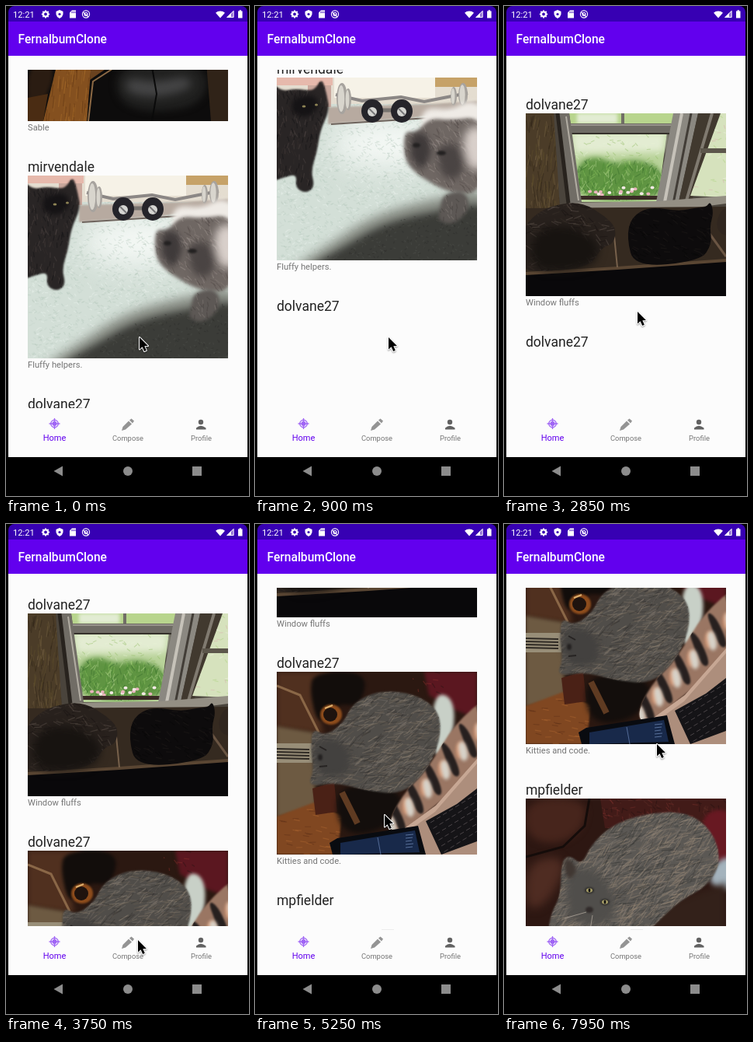
Animation of 313x630 px, one loop 8000 ms. Source, as an HTML page with a canvas:

```html
<!DOCTYPE html>
<html lang="en">
<head>
<meta charset="utf-8">
<title>FernalbumClone</title>
<style>
html, body { margin: 0; width: 100%; height: 100%; overflow: hidden; background: #000; }
canvas { display: block; width: 313px; height: 630px; }
</style>
</head>
<body>
<canvas id="stage" width="313" height="630"></canvas>
<script>
const ctx = document.getElementById('stage').getContext('2d');
const LOOP = 8000, STEP = 150, PITCH = 305, PW = 258, PH = 235;
const FONT = 'Roboto, sans-serif';

function random(seed) {
  return () => {
    seed = (seed * 1664525 + 1013904223) >>> 0;
    return seed / 4294967296;
  };
}

// Closed path through flat x,y points, either straight or rounded.
function path(p, smooth) {
  const out = new Path2D(), n = p.length / 2;
  const at = i => [p[(i % n) * 2], p[(i % n) * 2 + 1]];
  const mid = i => {
    const [a, b] = at(i), [c, d] = at(i + 1);
    return [(a + c) / 2, (b + d) / 2];
  };
  out.moveTo(...(smooth ? mid(0) : at(0)));
  for (let i = 1; i <= n; i++) {
    if (smooth) out.quadraticCurveTo(...at(i), ...mid(i));
    else out.lineTo(...at(i));
  }
  out.closePath();
  return out;
}

class Painter {
  constructor(seed, base) {
    this.canvas = document.createElement('canvas');
    this.canvas.width = PW;
    this.canvas.height = PH;
    this.g = this.canvas.getContext('2d');
    this.rnd = random(seed);
    this.rect(base, 0, 0, PW, PH);
  }
  rect(color, x, y, w, h) {
    this.g.fillStyle = color;
    this.g.fillRect(x, y, w, h);
  }
  fill(color, p, smooth = false, blur = 0) {
    const shape = path(p, smooth);
    this.g.filter = blur ? `blur(${blur}px)` : 'none';
    this.g.fillStyle = color;
    this.g.fill(shape);
    this.g.filter = 'none';
    return shape;
  }
  blob(color, p, blur = 0.7) { return this.fill(color, p, true, blur); }
  oval(color, x, y, rx, ry = rx, blur = 0) {
    this.g.filter = blur ? `blur(${blur}px)` : 'none';
    this.g.fillStyle = color;
    this.g.beginPath();
    this.g.ellipse(x, y, rx, ry, 0, 0, 7);
    this.g.fill();
    this.g.filter = 'none';
  }
  line(color, w, ...p) {
    this.g.strokeStyle = color;
    this.g.lineWidth = w;
    this.g.beginPath();
    for (let i = 0; i < p.length; i += 2) this.g.lineTo(p[i], p[i + 1]);
    this.g.stroke();
  }
  // Short strokes scattered over a shape: fur, carpet, leaves.
  fur(shape, colors, n, len, angle, spread = 0.5) {
    const { g, rnd } = this;
    g.save();
    g.clip(shape);
    g.globalAlpha = 0.4;
    for (let i = 0; i < n; i++) {
      const x = rnd() * PW, y = rnd() * PH, a = angle + (rnd() - 0.5) * 2 * spread;
      const c = colors[Math.floor(rnd() * colors.length)];
      this.line(c, 1.2, x, y, x + len * Math.cos(a), y + len * Math.sin(a));
    }
    g.restore();
  }
}

function sofaPhoto() {
  const p = new Painter(5, '#0d0c0c');
  p.fill('#20201f', [118, 160, 232, 160, 228, 215, 150, 225, 112, 205], true, 5);
  p.blob('#454546', [128, 178, 165, 186, 205, 176, 215, 192, 165, 206, 125, 198], 6);
  p.line('#0a0a0a', 2, 160, 165, 166, 200, 160, 235);
  const wood = p.fill('#84501f', [38, 160, 82, 160, 76, 235, 20, 235]);
  p.fur(wood, ['#b5762f', '#5c3313', '#9c6428'], 900, 16, 1.65, 0.08);
  p.fill('#2a1c12', [0, 160, 36, 160, 26, 205, 0, 225], true, 2);
  p.fill('#4a2c13', [0, 205, 26, 200, 20, 235, 0, 235]);
  p.fill('#6a421f', [82, 160, 112, 160, 80, 182]);
  p.line('#8d6a45', 2, 112, 166, 84, 184, 78, 235);
  p.fill('#302318', [230, 160, 258, 160, 258, 235, 236, 235]);
  return p.canvas;
}

function carpetPhoto() {
  const p = new Painter(11, '#d3dfd7');
  const all = path([0, 0, PW, 0, PW, PH, 0, PH]);
  p.oval('#f4f8f5', 145, 85, 75, 32, 18);
  p.fur(all, ['#b5c8bc', '#eef4f0', '#c3d2c8'], 2600, 4, 0.2, 1);
  p.rect('#e4ddd0', 0, 0, PW, 34);
  p.rect('#e6b9ac', 0, 0, 72, 10);
  p.rect('#c9a79c', 40, 10, 30, 28);
  p.rect('#f6f2e7', 74, 0, 130, 26);
  p.rect('#c6a268', 204, 0, 54, 12);
  p.fill('#b7aaa0', [66, 38, 130, 36, 200, 34, 258, 30, 258, 38, 175, 52, 66, 60], false, 1);
  p.line('#6e645d', 2, 70, 60, 195, 52);
  // Weights
  p.line('#8b8785', 4, 76, 22, 110, 30, 160, 25, 190, 31, 215, 26, 246, 20);
  for (const [x, y, w, h] of [[84, 27, 7, 20], [92, 28, 4, 14], [240, 22, 6, 15], [228, 24, 4, 12]]) {
    p.oval('#a7a39e', x, y, w, h);
    p.oval('#d8d5cd', x - 1, y, w * 0.6, h * 0.85);
  }
  p.line('#77736f', 5, 123, 42, 162, 42);
  for (const x of [123, 161]) {
    p.oval('#25242a', x, 43, 14, 15);
    p.oval('#d5d5d2', x, 44, 6, 6);
    p.line('#77777a', 2, x - 4, 40, x + 4, 48);
  }
  // Shadow across the floor
  p.blob('#83877f', [20, 245, 72, 212, 115, 183, 165, 165, 220, 153, 275, 140, 275, 255, 20, 255], 7);
  const shade = p.blob('#3b3c38', [38, 245, 90, 216, 132, 191, 180, 177, 230, 168, 275, 160, 275, 260, 38, 260], 5);
  p.fur(shade, ['#52544e', '#2b2b29'], 1500, 3, 0, 1.5);
  // Dark cat
  const cat = p.blob('#292525', [-8, 4, 6, 18, 25, 14, 48, 18, 58, 0, 64, 20, 68, 42, 56, 68, 52, 95, 44, 120, 49, 140,
    38, 149, 24, 142, 26, 124, 10, 128, -10, 135], 1);
  p.fur(cat, ['#111012', '#554c4a', '#39312f'], 1600, 7, 1.5);
  p.blob('#151315', [18, 28, 45, 20, 57, 35, 42, 52, 20, 48], 3);
  p.oval('#8e8455', 35, 37, 2.4, 1.6);
  p.oval('#8e8455', 51, 35, 2, 1.5);
  // Grey cat
  p.blob('#efebe6', [184, 52, 195, 38, 225, 42, 248, 28, 270, 40, 270, 90, 190, 92], 3);
  const face = p.blob('#6f6763', [164, 68, 180, 72, 196, 52, 225, 55, 262, 50, 272, 95, 262, 150, 225, 148, 202, 138,
    178, 122, 164, 105], 2);
  p.fur(face, ['#a69c96', '#514a48', '#89807b'], 1700, 8, 0.9);
  p.blob('#3f3a3a', [172, 74, 190, 68, 202, 92, 188, 122, 172, 105], 4);
  p.blob('#4a4443', [205, 90, 228, 82, 243, 104, 235, 132, 212, 128], 5);
  p.oval('#242222', 180, 87, 5, 3, 1);
  p.oval('#242222', 212, 97, 6, 3, 1);
  p.fill('#d9d0cb', [238, 68, 270, 58, 270, 120, 245, 118], true, 6);
  const paw = p.blob('#5d5855', [214, 150, 242, 144, 250, 168, 228, 190, 207, 184, 210, 170], 2);
  p.fur(paw, ['#8a837e', '#3f3b39'], 900, 6, 1.2);
  return p.canvas;
}

function windowPhoto() {
  const p = new Painter(23, '#17120e');
  p.rect('#4a443c', 34, 0, 224, 124);
  const glass = p.fill('#b9d39a', [58, 24, 182, 24, 170, 114, 70, 114]);
  p.fill('#e3ecd2', [58, 24, 182, 24, 178, 50, 62, 52], false, 5);
  p.fur(glass, ['#e6f2d5', '#8cba60'], 800, 5, 0.2, 1);
  const leaves = p.blob('#5f9442', [64, 66, 90, 54, 115, 66, 142, 58, 178, 72, 176, 112, 66, 112], 3);
  p.fur(leaves, ['#2f6526', '#93c765', '#4c8a35', '#c4e09c'], 2400, 8, -1.4, 0.9);
  for (let i = 0; i < 16; i++) {
    p.oval(i % 2 ? '#e8b4bd' : '#f3e9e4', 82 + p.rnd() * 82, 95 + p.rnd() * 11, 2.5, 2);
  }
  p.rect('#3a2b25', 68, 106, 102, 5);
  // Upper sash and rails
  p.fill('#b8d58d', [56, 0, 190, 0, 190, 15, 58, 15]);
  p.fill('#e2ecd3', [66, 0, 118, 0, 118, 13, 66, 13], false, 2);
  p.line('#716e66', 4, 125, 0, 125, 16);
  p.fill('#6e6b64', [46, 13, 194, 13, 192, 26, 50, 26]);
  p.line('#a4a098', 1.5, 48, 15, 192, 15);
  p.line('#35312b', 2, 50, 26, 186, 26);
  // Posts
  p.fill('#716d66', [40, 0, 56, 0, 72, 114, 56, 120]);
  p.line('#b1aca2', 2, 52, 4, 68, 112);
  p.line('#28231e', 5, 41, 0, 55, 116);
  p.fill('#8b8881', [190, 0, 222, 0, 196, 118, 168, 114]);
  p.line('#c6c2b9', 4, 201, 0, 179, 114);
  p.line('#423d37', 3, 213, 0, 190, 116);
  p.fill('#41392f', [222, 0, 250, 0, 214, 112, 196, 118]);
  p.line('#807a70', 4, 240, 0, 207, 112);
  const side = p.fill('#d6e2bd', [251, 0, 258, 0, 258, 108, 212, 106]);
  p.fur(side, ['#a5cc75', '#f2f4e7', '#d8a9aa'], 600, 5, 0.5, 1);
  p.rect('#5c564b', 225, 45, 33, 6);
  p.fill('#948f84', [56, 115, 170, 113, 258, 106, 258, 116, 205, 123, 56, 123]);
  // Curtain
  const drape = p.fill('#4b3c28', [0, 0, 36, 0, 44, 122, 0, 150]);
  p.fur(drape, ['#2c2115', '#7b6848', '#61502f'], 1200, 14, 1.6, 0.25);
  // Trays
  p.fill('#352a20', [0, 122, 258, 120, 258, 190, 120, 200, 0, 206]);
  p.fill('#09080a', [0, 205, 118, 198, 258, 188, 258, 235, 0, 235]);
  p.line('#5a4633', 4, 0, 206, 118, 199, 258, 189);
  p.line('#77614b', 2, 113, 148, 118, 198);
  p.line('#6a5543', 3, 232, 148, 258, 184);
  // Cats
  const tabby = p.blob('#28211d', [-5, 150, 14, 128, 40, 117, 72, 114, 102, 132, 117, 148, 113, 168, 98, 172, 82, 198,
    20, 204, -8, 200]);
  p.fur(tabby, ['#6d6057', '#15110f', '#40362f'], 1200, 10, 0.3, 0.8);
  p.blob('#171310', [8, 150, 60, 142, 98, 168, 85, 200, 5, 205], 6);
  const black = p.blob('#0d0b0c', [130, 160, 136, 133, 160, 120, 198, 126, 220, 121, 232, 121, 238, 113, 242, 128,
    237, 145, 240, 168, 225, 190, 140, 198]);
  p.fur(black, ['#241e1d', '#050505'], 800, 8, 0.4);
  p.blob('#30261f', [245, 145, 250, 125, 268, 118, 268, 158, 252, 156]);
  return p.canvas;
}

function laptopPhoto() {
  const p = new Painter(37, '#2b1811');
  p.fill('#50301f', [0, 0, 70, 0, 52, 40, 60, 80, 0, 72], false, 3);
  p.blob('#120d0b', [48, 0, 118, 0, 108, 45, 75, 40, 54, 72, 42, 25], 2);
  p.line('#8a6747', 3, 0, 18, 30, 30, 54, 78);
  p.oval('#8d4c1c', 70, 55, 14, 13, 1);
  p.oval('#1f130e', 69, 55, 9, 9);
  p.line('#ddb06e', 2, 62, 47, 72, 43);
  // Room on the left
  p.fill('#6d5a42', [0, 70, 48, 78, 50, 176, 0, 188], false, 2);
  p.rect('#988e78', 0, 92, 46, 25);
  for (let y = 99; y < 114; y += 4) p.line('#2f2a24', 2, 0, y, 42, y + 1);
  const floor = p.fill('#804721', [0, 186, 48, 168, 84, 185, 78, 235, 0, 235], false, 1);
  p.fur(floor, ['#b56d34', '#552b14'], 500, 8, 0.1, 0.2);
  p.fill('#4a2116', [46, 150, 74, 142, 78, 180, 50, 184]);
  p.blob('#130e0c', [74, 150, 130, 142, 168, 162, 140, 205, 82, 210], 3);
  p.line('#5f3b22', 8, 84, 155, 104, 195);
  // Cloths
  p.fill('#5b1720', [190, 0, 258, 0, 258, 60, 222, 46, 196, 30], false, 2);
  p.fur(path([175, 0, 215, 0, 215, 30, 175, 25]), ['#93332d', '#211312'], 500, 7, 1, 1);
  p.fill('#c8d0c7', [204, 26, 228, 34, 229, 80, 206, 116, 198, 80], true, 2);
  const blanket = p.blob('#9a7663', [275, 28, 228, 68, 198, 120, 160, 160, 142, 200, 160, 212, 202, 172, 275, 122], 1);
  p.g.save();
  p.g.clip(blanket);
  for (let i = 0; i < 6; i++) {
    const x = 152 + i * 23, y = 185 - i * 24;
    p.blob('#27201f', [x - 12, y - 25, x + 1, y - 18, x + 17, y + 18, x + 8, y + 24, x - 3, y + 1], 1);
    p.blob('#d7d2c8', [x - 12, y + 3, x - 2, y - 1, x + 4, y + 22, x - 6, y + 28], 2);
    p.oval('#d79773', x + 15, y - 12, 5, 11, 2);
  }
  p.g.restore();
  // Cat
  const cat = p.blob('#504d49', [46, 72, 62, 83, 86, 66, 98, 40, 132, 24, 178, 28, 210, 50, 211, 90, 190, 132, 160, 158,
    112, 152, 76, 142, 40, 148, 48, 126, 44, 100], 1);
  p.fur(cat, ['#7b746b', '#33312f', '#665d52', '#8d8171'], 2800, 13, -0.4, 0.6);
  p.blob('#43413f', [50, 86, 80, 84, 98, 106, 92, 134, 58, 136, 46, 112], 4);
  p.line('#272423', 2, 55, 96, 64, 101);
  p.line('#272423', 2, 55, 122, 65, 121);
  p.oval('#252222', 56, 110, 3, 4, 1);
  // Laptop
  p.fill('#ad8e7c', [158, 206, 205, 172, 258, 112, 258, 235, 184, 235]);
  p.fill('#c7a794', [158, 206, 205, 172, 258, 112, 258, 118, 204, 180, 162, 210]);
  p.fill('#151417', [192, 192, 232, 170, 258, 150, 258, 218, 212, 235]);
  for (let r = 0; r < 6; r++) {
    for (let c = 0; c < 8; c++) {
      const x = 198 + c * 8 + r * 3.5, y = 194 - c * 5 + r * 7.5;
      p.line('#4a4447', 1, x, y, x + 5, y - 3);
    }
  }
  p.fill('#090b10', [68, 220, 78, 214, 182, 198, 192, 235, 72, 235]);
  p.fill('#18294a', [82, 220, 178, 204, 184, 232, 82, 235]);
  p.line('#536b97', 1, 130, 213, 134, 235);
  for (let y = 210; y < 230; y += 4) p.line('#59719b', 1, 166, y, 176 - y % 3, y - 1);
  return p.canvas;
}

function couchPhoto() {
  const p = new Painter(51, '#2d1712');
  p.blob('#47251c', [0, 0, 80, 0, 74, 40, 40, 60, 0, 50], 5);
  p.blob('#4f2c22', [0, 85, 40, 72, 52, 90, 28, 135, 0, 145], 6);
  p.line('#150c0a', 3, 82, 0, 76, 35, 48, 62, 0, 75);
  const weave = p.fill('#421b18', [96, 0, 258, 0, 258, 40, 102, 38]);
  p.fur(weave, ['#80332d', '#1e1010', '#63302a'], 1200, 7, 0.8, 1);
  p.blob('#681922', [222, 20, 268, 10, 268, 86, 240, 80], 2);
  p.blob('#a4b3bd', [240, 85, 268, 70, 268, 122, 236, 112], 3);
  p.fill('#33211a', [170, 140, 258, 108, 258, 235, 140, 235], false, 4);
  const cat = p.blob('#5b5854', [28, 170, 34, 145, 45, 125, 46, 82, 56, 72, 72, 86, 84, 60, 110, 35, 150, 20, 205, 16,
    240, 40, 252, 80, 235, 112, 200, 130, 168, 160, 130, 200, 40, 205], 1);
  p.fur(cat, ['#898177', '#393735', '#746a60', '#a08e7c'], 3200, 16, -0.6, 0.6);
  p.blob('#504e4b', [52, 92, 80, 88, 108, 108, 120, 145, 90, 168, 52, 152], 5);
  p.blob('#403732', [48, 80, 56, 76, 68, 92, 54, 108], 2);
  for (const [x, y] of [[82, 118], [102, 133]]) {
    p.oval('#2b2a28', x, y, 6, 4, 1);
    p.oval('#a49b66', x, y, 4, 2.7);
    p.oval('#111', x, y, 1.4, 2.4);
  }
  p.oval('#322c2b', 82, 143, 5, 4, 1);
  p.line('#9b938a', 1, 78, 146, 50, 154);
  p.line('#9b938a', 1, 86, 150, 82, 175);
  return p.canvas;
}

const posts = [
  { user: '', text: 'Sable', photo: sofaPhoto(), from: 0 },
  { user: 'mirvendale', text: 'Fluffy helpers.', photo: carpetPhoto(), from: 0 },
  { user: 'dolvane27', text: 'Window fluffs', photo: windowPhoto(), from: 1500 },
  { user: 'dolvane27', text: 'Kitties and code.', photo: laptopPhoto(), from: 3300 },
  { user: 'mpfielder', text: '', photo: couchPhoto(), from: 6000 }
];

// Top of the second photo over time
const scroll = [
  [0, 218], [150, 210], [450, 176], [750, 122], [900, 92], [1050, 42], [1200, 7], [1800, 7],
  [1950, 3], [2100, 3], [2250, -10], [2550, -85], [2850, -167], [3000, -183], [3150, -190],
  [4650, -190], [4800, -215], [4950, -254], [5100, -325], [5250, -420], [5400, -510],
  [5550, -560], [7500, -560], [7950, -562]
];
const pointer = [
  [0, 172, 426], [2100, 172, 426], [2850, 172, 393], [3150, 172, 393], [3900, 170, 571],
  [4200, 163, 541], [4500, 163, 383], [4650, 163, 383], [4800, 167, 374], [7500, 167, 374],
  [7950, 197, 283]
];

function sample(keys, t) {
  let i = 0;
  while (i < keys.length - 2 && t >= keys[i + 1][0]) i++;
  const a = keys[i], b = keys[i + 1];
  const k = Math.min(1, (t - a[0]) / (b[0] - a[0]));
  return a.slice(1).map((v, j) => Math.round(v + (b[j + 1] - v) * k));
}

function label(str, x, y, size, color, weight = 400, align = 'left') {
  ctx.font = `${weight} ${size}px ${FONT}`;
  ctx.fillStyle = color;
  ctx.textAlign = align;
  ctx.fillText(str, x, y);
}
function box(color, x, y, w, h) {
  ctx.fillStyle = color;
  ctx.fillRect(x, y, w, h);
}
function poly(color, ...p) {
  ctx.fillStyle = color;
  ctx.fill(path(p));
}
function disc(color, x, y, r) {
  ctx.fillStyle = color;
  ctx.beginPath();
  ctx.arc(x, y, r, 0, 7);
  ctx.fill();
}
function ring(color, x, y, r, w) {
  ctx.strokeStyle = color;
  ctx.lineWidth = w;
  ctx.beginPath();
  ctx.arc(x, y, r, 0, 7);
  ctx.stroke();
}

function statusBar() {
  label('12:21', 9, 14.5, 11.2, '#fff');
  ring('#fff', 51, 10.5, 3, 2.2);
  for (let i = 0; i < 8; i++) {
    const a = i * Math.PI / 4;
    disc('#fff', 51 + 4.3 * Math.cos(a), 10.5 + 4.3 * Math.sin(a), 1);
  }
  poly('#fff', 69, 5, 73.5, 7, 73.5, 10.5, 72, 14, 69, 16, 66, 14, 64.5, 10.5, 64.5, 7);
  disc('#3700b3', 69, 10.5, 1.6);
  poly('#fff', 85, 5.5, 90, 5.5, 90, 15.5, 82, 15.5, 82, 8.5);
  for (let x = 84.5; x < 90; x += 2) box('#3700b3', x, 7, 0.9, 2.2);
  ring('#fff', 103, 10.5, 4.6, 1.1);
  ring('#fff', 103, 10.5, 2, 1.2);
  ctx.lineWidth = 1.1;
  ctx.beginPath();
  ctx.moveTo(99.5, 8);
  ctx.lineTo(106, 14);
  ctx.stroke();
  ctx.fillStyle = '#fff';
  ctx.beginPath();
  ctx.moveTo(276, 15.5);
  ctx.arc(276, 15.5, 9, -2.3, -0.84);
  ctx.fill();
  poly('#8d6bd2', 293.5, 5.5, 293.5, 15, 284, 15);
  poly('#fff', 290, 9, 290, 15, 284, 15);
  ctx.strokeStyle = '#fff';
  ctx.lineWidth = 1;
  ctx.stroke(path([293, 6.5, 293, 14.5, 285, 14.5]));
  box('#fff', 299, 6.5, 5.5, 9);
  box('#fff', 300.5, 5.3, 2.5, 1.5);
}

function tabs() {
  const violet = '#a066f5';
  ring(violet, 62.5, 537, 4.7, 1.5);
  disc(violet, 62.5, 537, 3);
  box(violet, 55.5, 536.3, 14, 1.4);
  box(violet, 61.8, 530, 1.4, 14);
  poly('#949494', 149, 546, 150.5, 541, 158, 533.5, 162, 537.5, 154, 544.5);
  poly('#949494', 159, 532.5, 161.5, 530.5, 165, 533.5, 163, 536.5);
  disc('#626262', 251, 535, 3.2);
  poly('#626262', 245, 544.5, 245, 542.5, 248, 540.4, 251, 539.8, 254, 540.4, 257.5, 542.5, 257.5, 544.5);
  label('Home', 62.5, 559, 11, '#6200ee', 400, 'center');
  label('Compose', 157, 559, 9.4, '#757575', 400, 'center');
  label('Profile', 251.5, 559, 9.4, '#757575', 400, 'center');
}

function feed(t) {
  const [top] = sample(scroll, t);
  ctx.save();
  ctx.beginPath();
  ctx.rect(28, 82, PW, 435);
  ctx.clip();
  posts.forEach((post, i) => {
    const y = top + (i - 1) * PITCH;
    label(post.user, 28, y - 5, 17.5, '#212121');
    if (t >= post.from) ctx.drawImage(post.photo, 28, y);
    label(post.text, 28, y + PH + 12, 11.2, '#757575');
  });
  ctx.restore();
}

function arrow(x, y) {
  const tip = path([0, 0, 0, 15.5, 3.6, 12.3, 6.2, 18, 8.8, 16.8, 6.3, 11.3, 11, 11]);
  ctx.save();
  ctx.translate(x, y);
  ctx.lineJoin = 'round';
  ctx.strokeStyle = '#fff';
  ctx.lineWidth = 2;
  ctx.shadowColor = 'rgba(0,0,0,.4)';
  ctx.shadowBlur = 2;
  ctx.shadowOffsetY = 1;
  ctx.stroke(tip);
  ctx.shadowColor = 'transparent';
  ctx.fillStyle = '#000';
  ctx.fill(tip);
  ctx.restore();
}

function draw(now) {
  const t = Math.floor((now % LOOP) / STEP) * STEP;
  box('#000', 0, 0, 313, 630);
  box('#fcfcfc', 3, 64, 308, 516);
  ctx.fillStyle = '#3700b3';
  ctx.beginPath();
  ctx.roundRect(3, 0, 308, 24, [8, 8, 0, 0]);
  ctx.fill();
  box('#6200ee', 3, 20, 308, 44);
  statusBar();
  label('FernalbumClone', 15.5, 48, 15.6, '#fff', 500);
  feed(t);
  tabs();
  if (t >= 4500) box('#ececec', 163, 521, 16, 1);
  poly('#8c8c8c', 61.5, 598, 73, 591.5, 73, 604.5);
  disc('#8c8c8c', 157, 598, 6);
  box('#8c8c8c', 240, 592, 12, 12);
  arrow(...sample(pointer, t));
}

const start = performance.now();
function tick() {
  draw(performance.now() - start);
  requestAnimationFrame(tick);
}
tick();
</script>
</body>
</html>
```
